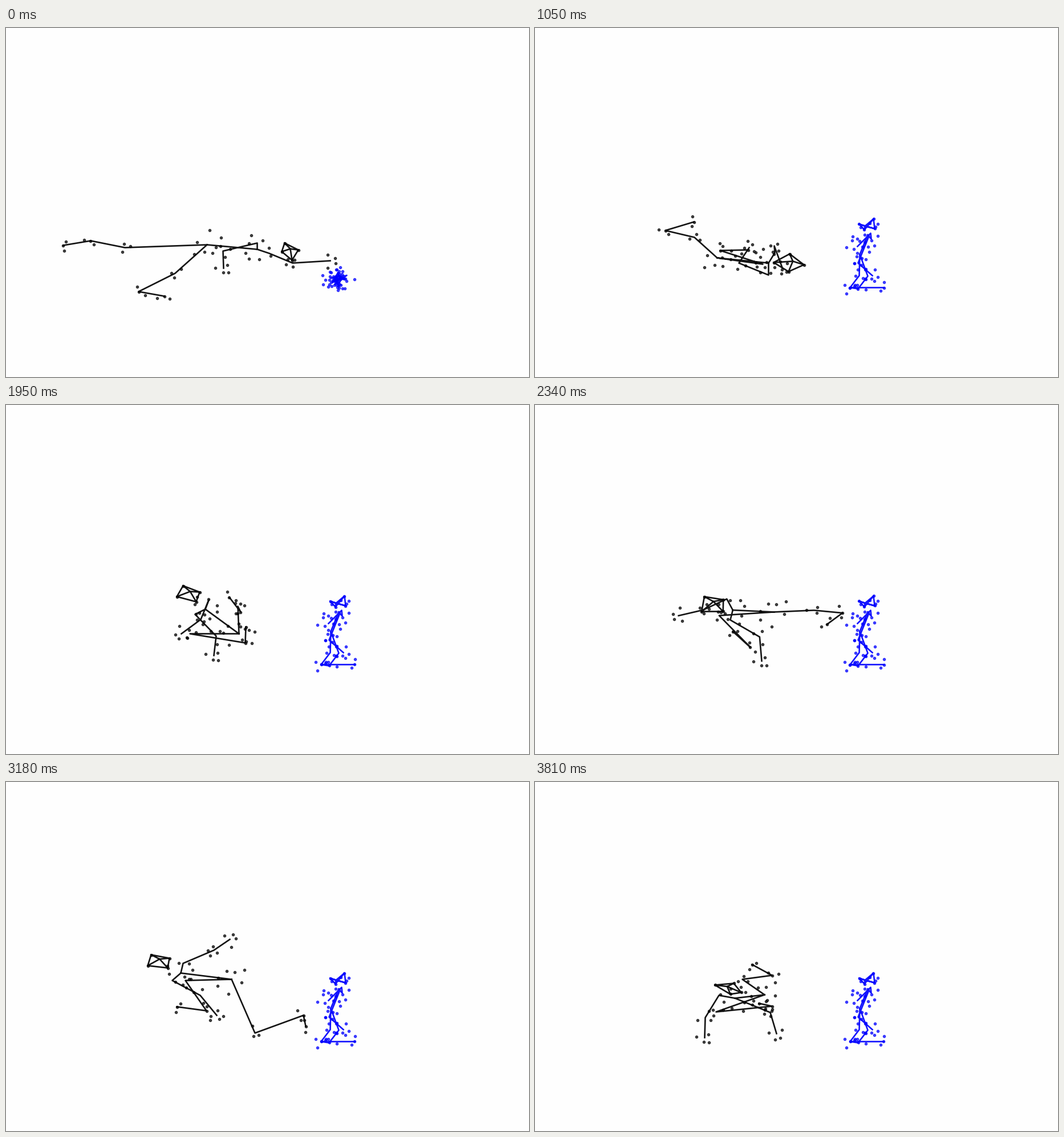
Recreate the animation shown at these times as a matplotlib script. Size 917 by 611 pixels, loop 3.84 s.

```python
import numpy as np
import matplotlib.pyplot as plt
from matplotlib.animation import FuncAnimation

W, H, DPI = 917, 611, 100
FRAMES, STEP = 128, 30

# Joints: hip 0, chest 1, arm A 2-4, arm B 5-7, leg P 8-10, leg Q 11-13, head corners 14-17
PARENT = [0, 0, 1, 2, 3, 1, 5, 6, 0, 8, 9, 0, 11, 12, 1, 1, 1, 1]
HUB = 18
CHAINS = [[0, 8, 9, 10], [0, 11, 12, 13], [0, 1], [1, 2, 3, 4], [1, 5, 6, 7],
          [14, 15, 16, 17, 14], [14, HUB, 16], [15, HUB, 17]]
DOTTED = [9, 10, 12, 13, 14, 15, 16, 17]


def points(*xy):
    return np.array(xy[0::2]) + 1j * np.array(xy[1::2])


# Key poses of the black body: time in frames, joints
lying = points(
    352, 379, 440, 387, 440, 376, 380, 390, 381, 420, 461, 394, 502, 411, 568, 407,
    208, 384, 148, 372, 100, 380, 296, 429, 232, 461, 277, 469,
    488, 376, 512, 388, 501, 406, 483, 391)
knees_up = points(
    332, 410, 418, 408, 419, 389, 357, 393, 361, 425, 431, 422, 470, 440, 535, 428,
    213, 358, 262, 375, 233, 362, 307, 323, 306, 382, 277, 365,
    470, 407, 484, 404, 486, 423, 457, 427)
folded = points(
    319, 402, 409, 411, 409, 432, 357, 411, 375, 384, 420, 393, 419, 381, 433, 419,
    279, 366, 228, 354, 278, 339, 399, 413, 324, 389, 373, 388,
    446, 395, 471, 414, 444, 426, 418, 410)
crouched = points(
    408, 400, 349, 357, 331, 366, 368, 404, 364, 438, 355, 341, 341, 375, 307, 400,
    322, 400, 419, 416, 420, 388, 406, 352, 411, 362, 391, 336,
    310, 316, 339, 327, 333, 344, 299, 335)
reaching = points(
    415, 333, 340, 345, 345, 361, 400, 392, 424, 434, 320, 330, 285, 291, 246, 271,
    317, 338, 346, 388, 293, 382, 434, 425, 511, 381, 517, 414,
    289, 327, 322, 330, 324, 352, 288, 352)
swinging = points(
    395, 345, 306, 334, 291, 347, 340, 373, 369, 408, 310, 317, 364, 294, 392, 275,
    314, 347, 351, 400, 299, 393, 436, 439, 521, 408, 525, 427,
    254, 302, 286, 308, 283, 325, 248, 321)
on_hands = points(
    402, 372, 350, 378, 322, 373, 298, 412, 297, 447, 370, 386, 412, 403, 423, 440,
    363, 345, 415, 338, 380, 319, 317, 402, 415, 392, 392, 387,
    315, 355, 348, 352, 361, 368, 342, 371)
KEYS = np.array([0, 16, 35, 65, 90, 106, 127])

# Rest pose of the blue body
standing = points(
    569, 396, 583, 362, 589, 369, 588, 359, 565, 382, 585, 364, 566, 411, 591, 433,
    568, 433, 552, 454, 611, 454, 583, 434, 566, 456, 552, 454,
    568, 343, 577, 353, 593, 334, 595, 351)

poses = np.array([lying, knees_up, folded, crouched, reaching, swinging, on_hands])
bones = poses - poses[:, PARENT]
lengths = np.abs(bones)
angles = np.unwrap(np.angle(bones), axis=0)

# Loose markers sit around their joint: wide on the trunk, close on the limbs
rng = np.random.default_rng(7)
CARRIER = np.repeat([0, 1, 3, 4, 6, 7, 8, 9, 10, 11, 12, 13],
                    [7, 8, 3, 4, 4, 4, 3, 2, 2, 3, 2, 2])
reach = np.where(CARRIER < 2, 27, 13) * rng.uniform(0.5, 1.1, len(CARRIER))
SPREAD = reach * np.exp(2.4j * np.arange(len(CARRIER)))


def smooth(values, t):
    """Cubic Hermite through the key poses."""
    slope = np.gradient(values, KEYS, axis=0)
    i = min(np.searchsorted(KEYS, t, "right") - 1, len(KEYS) - 2)
    h = KEYS[i + 1] - KEYS[i]
    u = (t - KEYS[i]) / h
    a = u * u * (3 - 2 * u)
    return ((1 - a) * values[i] + a * values[i + 1]
            + h * u * (1 - u) * ((1 - u) * slope[i] - u * slope[i + 1]))


def add_hub(joints):
    """The hub lies between the head's centre and its first edge."""
    head = joints[14:18]
    return np.append(joints, (head.mean() + head[:2].mean()) / 2)


def markers(joints):
    """Place markers so that they turn with the bone ending at their joint."""
    bone = joints - joints[PARENT]
    bone[0] = bone[1]
    turn = np.exp(1j * np.angle(bone))
    return joints[CARRIER] + SPREAD * turn[CARRIER]


def black_body(t):
    bone = np.maximum(smooth(lengths, t), 0) * np.exp(1j * smooth(angles, t))
    joints = np.empty(len(PARENT), complex)
    joints[0] = smooth(poses[:, 0], t)
    for j in range(1, len(PARENT)):
        joints[j] = joints[PARENT[j]] + bone[j]
    return add_hub(joints), markers(joints)


def cloud(n, size):
    return 581 + 441j + rng.normal(0, size, n) + 1j * rng.normal(0, 0.8 * size, n)


blue_end = np.concatenate([add_hub(standing), markers(standing)])
blue_start = np.concatenate([cloud(HUB + 1, 8), cloud(len(CARRIER), 13)])


def blue_body(t):
    # Damped spring from a huddled cloud to standing
    a, b = 0.173, 0.306
    left = np.exp(-a * t) * (np.cos(b * t) + a / b * np.sin(b * t))
    return np.split(blue_end + (blue_start - blue_end) * left, [HUB + 1])


fig = plt.figure(figsize=(W / DPI, H / DPI), dpi=DPI, facecolor="#fefefe")
ax = fig.add_axes([0, 0, 1, 1])
ax.set_xlim(-0.5, W - 0.5)
ax.set_ylim(H - 0.5, -0.5)
ax.axis("off")


def actor(body_at, color):
    line, = ax.plot([], [], color=color, lw=1.9, alpha=0.92)
    dots = ax.scatter([], [], s=9, color=color, alpha=0.7, linewidths=1)
    return body_at, line, dots


actors = [actor(black_body, "black"), actor(blue_body, "blue")]


def draw(t):
    for body_at, line, dots in actors:
        joints, loose = body_at(t)
        path = np.concatenate([np.append(joints[c], complex(np.nan, np.nan)) for c in CHAINS])
        line.set_data(path.real, path.imag)
        spots = np.concatenate([loose, joints[DOTTED]])
        dots.set_offsets(np.column_stack([spots.real, spots.imag]))
    return [artist for a in actors for artist in a[1:]]


anim = FuncAnimation(fig, draw, frames=FRAMES, interval=STEP, repeat=True,
                     repeat_delay=0, blit=False)
plt.show()
```
